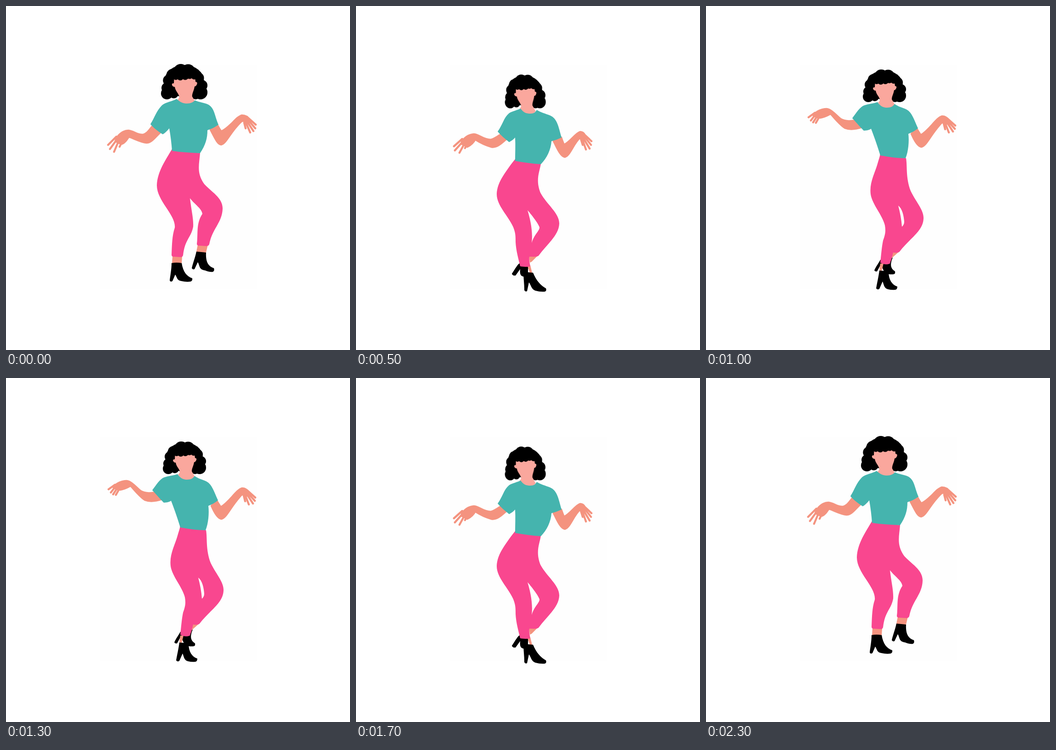
An HTML page without scripts for the animation above (2400 ms loop, 748 by 748 pixels).

```html
<!DOCTYPE html>
<html lang="en">
<head>
<meta charset="utf-8">
<title>Dancer</title>
<style>
html, body { margin: 0; width: 100%; height: 100%; overflow: hidden; background: #fff; }
svg { display: block; width: 100%; height: 100%; }

/* Four key poses: a (tall), b (swing), c (turn), d (dip). Half steps fall between b, c and d. */
path.part { animation: dance 1.2s infinite step-end; }
#head { animation: nod 1.2s infinite step-end; }

@keyframes dance {
  0%, 91.6666% { d: var(--a); }
  8.3333% { d: var(--b); animation-timing-function: steps(2, end); }
  25% { d: var(--c); animation-timing-function: steps(2, end); }
  41.6666% { d: var(--d); }
  50% { d: var(--d); animation-timing-function: steps(2, end); }
  66.6666% { d: var(--c); animation-timing-function: steps(2, end); }
  83.3333% { d: var(--b); }
  100% { d: var(--a); }
}
@keyframes nod {
  0%, 91.6666% { transform: matrix(1.075, 0, 0, 1.085, -29.6, -23.7); }
  8.3333% { transform: matrix(1, 0, 0, 1, 0, 0); animation-timing-function: steps(2, end); }
  25% { transform: matrix(1, 0, 0, 1, -11, .5); animation-timing-function: steps(2, end); }
  41.6666% { transform: matrix(.946, 0, .04, 1.035, -6.7, 6.2); }
  50% { transform: matrix(.946, 0, .04, 1.035, -6.7, 6.2); animation-timing-function: steps(2, end); }
  66.6666% { transform: matrix(1, 0, 0, 1, -11, .5); animation-timing-function: steps(2, end); }
  83.3333% { transform: matrix(1, 0, 0, 1, 0, 0); }
  100% { transform: matrix(1.075, 0, 0, 1.085, -29.6, -23.7); }
}

.skin { fill: #f4937f; }
.arm { stroke: #f4937f; stroke-width: 4.4; stroke-linecap: round; stroke-linejoin: round; }
.face { fill: #faa79d; }
#shirt { fill: #45b4ae; }
#pants { fill: #f9478f; fill-rule: evenodd; }

#back-shoe {
  --a: path("M414 534C411 548 406 560 404 570Q406 574 410 572L417 557C422 565 419 573 433 575Q443 579 450 578Q454 575 452 570C440 566 434 557 435 536Q425 532 414 534Z");
  --b: path("M379 552C375 560 369 567 366 575Q368 578 372 577L379 564C386 567 383 580 397 583Q404 584 409 583Q412 582 411 577C404 572 398 566 406 547Z");
  --c: path("M370 549C359 552 351 564 340 576Q340 580 346 579L358 566C357 574 359 581 367 582Q374 585 381 584Q385 583 383 577C378 570 374 563 378 549Z");
  --d: path("M358 558C351 561 346 572 339 582Q340 587 347 586L357 572C356 580 357 587 363 588Q367 590 372 588Q375 584 374 580C374 574 374 569 376 560Z");
}
#ankles {
  --a: path("M417 519L439 519 435 536 414 534ZM362 544L383 544 382 560 361 560Z");
  --b: path("M407 534L420 534 403 549 402 556ZM379 560L386 560 382 576 377 574Z");
  --c: path("M372 543L376 543 374 551 366 550ZM374 560L395 562 394 579 383 578Z");
  --d: path("M376 543L394 544 382 556 378 558ZM373 566L379 564 383 580 378 580Z");
}
#front-shoe {
  --a: path("M360 559C360 573 357 587 356 597Q358 601 362 598L368 584C372 590 372 597 381 598Q393 601 402 599Q406 597 405 592C393 588 385 578 382 559Q371 557 360 559Z");
  --b: path("M377 575C375 590 372 602 370 614Q373 618 377 615L384 599C387 606 387 614 396 616Q404 618 412 617Q416 616 416 610C404 606 397 595 397 577Z");
  --c: path("M374 579C374 592 372 604 372 617Q375 620 378 618L384 601C389 608 388 616 397 618Q405 620 414 620Q419 618 417 612C404 608 397 595 395 578Z");
  --d: path("M364 578C364 592 366 604 366 618Q368 622 372 620L376 601C381 607 381 616 390 619Q401 622 411 621Q415 619 413 614C401 607 392 597 385 580Z");
}
#pants {
  --a: path("M361 311L422 320C420 345 414 363 431 387C446 404 472 417 471 441C470 471 448 485 442 518C441 521 438 522 436 522L418 521Q415 520 415 517C418 494 413 473 427 452C426 441 411 432 400 418C403 444 408 463 407 480C402 505 389 507 385 542Q384 546 380 546L363 545Q360 544 360 541C361 518 361 500 367 482C370 455 328 424 328 390C329 360 347 335 361 311Z");
  --b: path("M379 321L435 331C438 350 434 373 445 402C457 427 474 444 473 462C472 490 443 505 421 534C418 537 412 537 407 536C405 546 402 553 400 560C394 563 385 562 379 558C381 540 382 525 385 510C390 497 391 489 389 477C384 455 361 431 358 409C355 384 367 364 373 343C375 335 378 328 379 321ZM418 434C427 441 430 456 431 469C431 474 429 477 426 480C425 465 422 449 418 434Z");
  --c: path("M373 321L430 333C433 355 430 376 439 402C447 427 463 446 461 471C457 497 424 515 401 541C400 543 399 543 397 544C397 551 396 558 395 564C388 566 379 565 373 562C373 545 372 529 375 512C379 499 379 491 376 477C369 452 351 429 350 406C350 384 362 364 368 343C370 335 371 328 373 321ZM409 442C416 446 418 463 419 475C419 480 418 485 414 488C413 473 412 457 409 442Z");
  --d: path("M346 333L402 343C399 361 390 378 401 406C415 432 442 450 442 473C441 499 416 517 397 543C394 546 385 545 377 545C376 553 378 560 379 566C372 568 364 567 357 566C353 549 348 532 347 513C347 500 347 494 342 481C331 456 306 434 306 409C307 384 323 365 333 350C338 343 342 338 346 333ZM373 444C380 452 396 472 399 481C400 488 387 497 382 515C385 490 379 464 373 444Z");
}
#left-arm {
  --a: path("M335 275C324 285 316 298 305 297C293 296 281 289 267 284C263 290 258 298 251 300L238 294C241 282 254 271 266 271C278 272 285 281 298 280C308 277 312 269 318 262ZM240 284L222 302M242 289L226 311M246 291L235 317M252 296L247 306");
  --b: path("M340 263C325 268 312 269 302 265C290 257 281 245 271 234C262 239 253 243 245 243L234 238C240 228 253 224 262 224C273 225 283 238 293 246C304 252 316 251 330 248ZM237 232L223 242M238 236L228 249M242 239L233 253M247 240L239 254");
  --c: path("M328 259C315 260 301 261 293 255C281 246 270 232 257 219C250 224 242 228 235 227L224 221C229 213 238 209 248 209C259 210 268 220 280 231C290 240 301 242 313 244ZM228 214L209 221M229 219L211 230M233 222L218 234M238 224L224 235");
  --d: path("M327 289C318 297 306 309 294 306C282 303 270 297 259 290C256 296 249 303 242 306L229 299C233 287 245 280 256 279C267 279 276 291 293 291C302 289 309 283 317 278ZM231 289L213 305M232 295L215 314M236 299L225 319M241 301L237 309");
}
#right-arm {
  --a: path("M445 269C453 284 460 301 468 301C480 298 489 270 514 249L522 253 530 248C526 241 521 238 513 238C500 241 488 264 468 273C465 269 462 264 460 260ZM525 242L543 258M525 246L542 266M523 249L538 272M520 250L531 275M517 250L521 266");
  --b: path("M447 278C453 292 460 305 468 306C480 304 489 277 513 253L522 256 530 252C525 244 521 240 513 240C500 244 487 269 467 281C464 277 461 272 458 267ZM524 244L542 260M524 248L541 267M522 250L537 273M519 252L528 275M516 252L520 268");
  --c: path("M437 280C443 295 451 311 459 311C471 309 478 283 501 264L507 267 515 263C511 255 507 251 499 251C486 255 474 276 458 285C455 281 452 276 449 271ZM509 254L527 269M509 258L526 276M507 261L523 284M505 263L516 286M502 263L506 277");
  --d: path("M430 294C437 308 445 327 454 328C465 326 472 300 487 286L493 290 500 286C497 278 494 274 487 274C477 277 466 296 452 302C450 297 448 292 446 286ZM495 278L512 294M495 282L511 302M493 285L508 310M491 287L500 312M488 286L493 302");
}
#shirt {
  --a: path("M371 202C380 210 385 212 394 212C402 212 407 209 411 205C421 210 432 210 441 215C454 224 453 237 462 258C455 263 448 267 438 270C438 288 434 302 422 320C401 319 381 318 361 315C360 300 358 283 355 266C351 271 346 276 341 279C331 273 321 265 314 257C323 243 327 228 339 216C349 208 361 208 371 202Z");
  --b: path("M373 209C380 219 386 221 394 221C402 221 407 218 410 213C418 219 428 221 436 225C447 231 451 243 461 266C455 271 448 275 440 278C442 294 440 316 434 331C416 331 397 328 379 325C374 308 367 288 359 267C354 270 348 271 343 271C333 261 326 252 318 244C327 232 334 220 344 216C353 213 364 212 373 209Z");
  --c: path("M362 209C369 218 375 220 383 220C391 220 396 218 399 214C407 218 416 221 425 225C437 231 443 248 452 269C446 273 440 276 433 279C435 296 433 318 428 334C410 333 391 330 373 326C368 309 360 287 352 264C347 265 341 266 336 265C325 255 316 246 307 238C316 230 325 219 335 215C343 212 353 212 362 209Z");
  --d: path("M358 223C364 232 371 234 379 234C387 234 390 231 393 226C401 231 412 234 422 238C438 245 440 262 447 286C440 289 433 292 425 294C424 312 415 331 402 344C384 343 364 340 346 337C346 320 347 303 346 286C343 290 338 293 333 296C324 289 315 281 308 273C319 258 321 243 333 233C341 228 350 227 358 223Z");
}
</style>
</head>
<body>
<svg viewBox="0 0 748 748">
  <rect x="204" y="128" width="341" height="488" fill="#fefefe"/>
  <path class="part" id="back-shoe"/>
  <path class="part skin" id="ankles"/>
  <path class="part" id="front-shoe"/>
  <path class="part" id="pants"/>
  <path class="part skin arm" id="left-arm"/>
  <path class="part skin arm" id="right-arm"/>
  <g id="head">
    <ellipse cx="388" cy="172" rx="40" ry="32"/>
    <circle cx="381" cy="153" r="15"/>
    <circle cx="396" cy="153" r="14.5"/>
    <circle cx="408" cy="158" r="11"/>
    <circle cx="417" cy="166" r="11"/>
    <circle cx="424" cy="181" r="11"/>
    <circle cx="421" cy="195" r="14"/>
    <circle cx="411" cy="200" r="9"/>
    <circle cx="364" cy="160" r="12"/>
    <circle cx="356" cy="171" r="11"/>
    <circle cx="353" cy="186" r="11"/>
    <circle cx="353" cy="197" r="12"/>
    <circle cx="367" cy="198" r="9"/>
    <path class="face" d="M368 160L409 160 411 174Q415 174 414 178Q412 183 409 183C408 191 404 196 404 203L411 215Q404 224 393 224Q382 223 374 210Q378 207 378 203C376 196 370 192 369 184Q364 184 363 179Q364 176 367 177Z"/>
    <ellipse cx="388" cy="158" rx="22" ry="10"/>
    <circle cx="371" cy="164" r="6"/>
    <circle cx="380" cy="164" r="7"/>
    <circle cx="390" cy="163" r="7"/>
    <circle cx="399" cy="162" r="6"/>
    <circle cx="408" cy="163" r="6"/>
  </g>
  <path class="part" id="shirt"/>
</svg>
</body>
</html>
```
